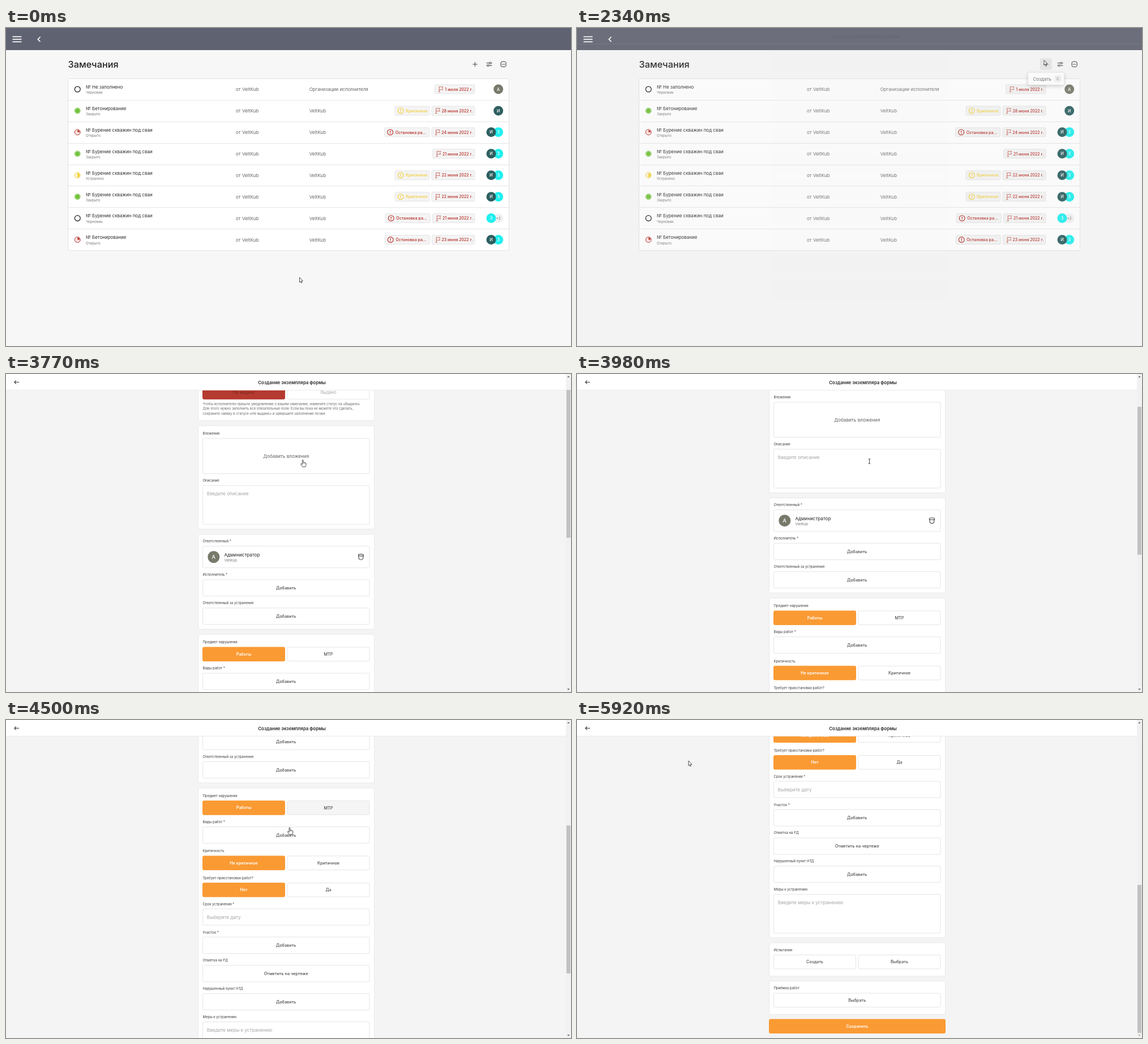
Write an HTML page with a canvas that moves like this. It is 998 px wide and 561 px high and loops after 5.97 s.

```html
<!DOCTYPE html>
<html lang="ru">
<head>
<meta charset="utf-8">
<title>Замечания</title>
<style>
html, body { margin: 0; width: 100%; height: 100%; overflow: hidden; background: #f7f7f7; }
canvas { display: block; width: 998px; height: 561px; }
</style>
</head>
<body>
<canvas id="stage"></canvas>
<script>
const W = 998, H = 561, LOOP = 5970, MAX_SCROLL = 605;
const FIRM = 'VeltKub';
const RED = '#b3261e', YELLOW = '#f3cc30', GREEN = '#70c13a', ORANGE = '#fa9a33', BRICK = '#b53a30';
const OLIVE = '#77796b', TEAL = '#2d5f60', CYAN = '#20efef', FLAG = '#c4574e';

const canvas = document.getElementById('stage');
const ctx = canvas.getContext('2d');
const dpr = window.devicePixelRatio || 1;
canvas.width = W * dpr;
canvas.height = H * dpr;

// ---------- motion ----------

// Smooth monotone curve through [time, value] points.
function curve(pts) {
  const n = pts.length;
  const d = pts.slice(1).map((p, i) => (p[1] - pts[i][1]) / (p[0] - pts[i][0]));
  const m = pts.map((_, i) => {
    if (i === 0 || i === n - 1 || d[i - 1] * d[i] <= 0) return 0;
    return 2 * d[i - 1] * d[i] / (d[i - 1] + d[i]);
  });
  return t => {
    if (t <= pts[0][0]) return pts[0][1];
    for (let i = 0; i < n - 1; i++) {
      const [t0, v0] = pts[i], [t1, v1] = pts[i + 1];
      if (t > t1) continue;
      const h = t1 - t0, u = (t - t0) / h, u2 = u * u, u3 = u2 * u;
      return v0 * (2 * u3 - 3 * u2 + 1) + v1 * (3 * u2 - 2 * u3) +
        h * (m[i] * (u3 - 2 * u2 + u) + m[i + 1] * (u3 - u2));
    }
    return pts[n - 1][1];
  };
}

const clamp = v => Math.max(0, Math.min(1, v));
const scrollAt = curve([[3510, 0], [3980, 104.5], [4500, 379.5], [4740, 522], [4940, 522], [5050, 573.5], [5200, 605]]);
const path = [
  [15, 518.5, 440], [600, 829, 61], [1050, 827, 60], [1420, 827, 60], [1920, 825, 57],
  [2420, 825, 57], [2870, 767, 112], [3490, 540, 148], [3980, 516.5, 154],
  [4380, 501, 189.5], [5750, 501, 189.5], [5920, 197, 72]
];
const mouseX = curve(path.map(p => [p[0], p[1]]));
const mouseY = curve(path.map(p => [p[0], p[2]]));

// ---------- drawing helpers ----------

function text(str, x, y, size, color, weight = 400, align = 'left') {
  ctx.font = `${weight} ${size}px Inter, "Open Sans", sans-serif`;
  ctx.fillStyle = color;
  ctx.textAlign = align;
  ctx.fillText(str, x, y + size * 0.36);
}

function box(x, y, w, h, r, fill, stroke) {
  ctx.beginPath();
  ctx.roundRect(x, y, w, h, r);
  if (fill) { ctx.fillStyle = fill; ctx.fill(); }
  if (stroke) { ctx.strokeStyle = stroke; ctx.lineWidth = 1; ctx.stroke(); }
}

function rect(x, y, w, h, fill) {
  ctx.fillStyle = fill;
  ctx.fillRect(x, y, w, h);
}

function disc(x, y, r, fill) {
  ctx.beginPath();
  ctx.arc(x, y, r, 0, 7);
  ctx.fillStyle = fill;
  ctx.fill();
}

function ring(x, y, r, color, width) {
  ctx.beginPath();
  ctx.arc(x, y, r, 0, 7);
  ctx.strokeStyle = color;
  ctx.lineWidth = width;
  ctx.stroke();
}

function line(pts, color, width = 1) {
  ctx.beginPath();
  pts.forEach(([x, y], i) => i ? ctx.lineTo(x, y) : ctx.moveTo(x, y));
  ctx.strokeStyle = color;
  ctx.lineWidth = width;
  ctx.stroke();
}

function shape(pts, fill, stroke) {
  ctx.beginPath();
  pts.forEach(([x, y]) => ctx.lineTo(x, y));
  ctx.closePath();
  ctx.fillStyle = fill;
  ctx.fill();
  if (stroke) {
    ctx.strokeStyle = stroke;
    ctx.lineWidth = 0.8;
    ctx.lineJoin = 'round';
    ctx.stroke();
  }
}

function avatar(x, y, r, letter, color) {
  disc(x, y, r, color);
  text(letter, x, y, r * 0.86, '#fff', 500, 'center');
}

// ---------- list page ----------

const HOLE = '№ Бурение скважин под сваи', CAST = '№ Бетонирование';
const STOP = 'Остановка ра...', CRIT = 'Критичное';
const rows = [
  ['№ Не заполнено', 'Черновик', '1 июля', 757.5, '', 'А'],
  [CAST, 'Закрыто', '28 июня', 752, CRIT, 'И'],
  [HOLE, 'Открыто', '24 июня', 752, STOP, 'ИЗ'],
  [HOLE, 'Закрыто', '21 июня', 753.5, '', 'ИЗ'],
  [HOLE, 'Устранено', '22 июня', 752, CRIT, 'ИЗ'],
  [HOLE, 'Закрыто', '22 июня', 752, CRIT, 'ИЗ'],
  [HOLE, 'Черновик', '21 июня', 753.5, STOP, 'З+'],
  [CAST, 'Открыто', '23 июня', 752.5, STOP, 'ИЗ']
];
const people = { 'А': OLIVE, 'И': TEAL, 'З': CYAN };

function statusIcon(x, y, status) {
  const color = { 'Черновик': '#222', 'Закрыто': GREEN, 'Открыто': RED, 'Устранено': YELLOW }[status];
  if (status === 'Закрыто') disc(x, y, 3.9, color);
  if (status === 'Открыто' || status === 'Устранено') {
    disc(x, y, 4.2, status === 'Открыто' ? '#fae3e1' : '#fdf4cf');
    ctx.beginPath();
    ctx.moveTo(x, y);
    ctx.arc(x, y, 3.7, -Math.PI / 2, status === 'Открыто' ? 0 : Math.PI / 2);
    ctx.fillStyle = color;
    ctx.fill();
  }
  ring(x, y, 4.9, color, status === 'Черновик' ? 1.3 : 1);
}

function dateBadge(left, y, date) {
  box(left, y - 8, 828 - left, 16, 2, '#f4f4f4', '#e5e5e5');
  const x = left + 6.5;
  line([[x + 1.2, y - 4.5], [x + 1.2, y + 4.5]], FLAG, 0.9);
  line([[x - 0.5, y + 4.6], [x + 3, y + 4.6]], FLAG, 0.8);
  line([[x + 1, y - 4.2], [x + 8, y - 4.2], [x + 6.3, y - 1.7], [x + 8, y + 0.8], [x + 1, y + 0.8]], FLAG, 0.8);
  text(date + ' 2022 г.', 824.3, y + 0.2, 7, RED, 500, 'right');
}

function levelBadge(right, y, label) {
  const w = label === STOP ? 79 : 60.5, x = right - w;
  const color = label === STOP ? RED : YELLOW;
  box(x, y - 8, w, 16, 2, '#f4f4f4', '#e5e5e5');
  ring(x + 10, y, 4.9, color, 1.1);
  line([[x + 10, y - 2.7], [x + 10, y + 0.7]], color, 1.2);
  disc(x + 10, y + 2.3, 0.75, color);
  text(label, x + 19, y + 0.2, 7.1, color, 500);
}

function drawRow(row, i) {
  const [name, status, date, left, level, who] = row;
  const y = 108 + i * 37.93;
  statusIcon(126.3, y, status);
  text(name, 141, y - 4, 8, '#2b2b2b');
  text(status, 141, y + 6.2, 6.2, '#777');
  text('от ' + FIRM, 406, y + 0.2, 8.1, '#666');
  text(i ? FIRM : 'Организации исполнителя', 535.7, y + 0.2, 8.05, '#666');
  dateBadge(left, y, date);
  if (level) levelBadge(left - 4.3, y, level);
  const last = who[who.length - 1];
  if (last === '+') {
    disc(869.7, y, 8.3, '#f0f0f0');
    text('+2', 869.7, y, 6.6, '#777', 400, 'center');
  } else {
    avatar(869.7, y, 8.5, last, people[last]);
  }
  if (who.length > 1) avatar(857, y, 8.5, who[0], people[who[0]]);
}

function drawToolbar(t) {
  const hover = clamp((t - 560) / 100);
  ctx.globalAlpha = hover;
  box(818, 53.5, 20.5, 20.5, 2, '#e7e7e7');
  ctx.globalAlpha = 1;
  line([[824.3, 64], [832.7, 64]], '#444');
  line([[828.5, 59.8], [828.5, 68.2]], '#444');
  line([[848.5, 61.8], [858.5, 61.8]], '#333');
  line([[848.5, 66.2], [858.5, 66.2]], '#333');
  for (const [x, y] of [[855.3, 61.8], [851.5, 66.2]]) {
    disc(x, y, 1.7, '#f7f7f7');
    ring(x, y, 1.6, '#333', 1);
  }
  box(874, 59.3, 9.2, 9.2, 2.6, null, '#333');
  for (let i = -1; i < 2; i++) disc(878.6 + i * 2.2, 64, 0.8, '#333');
}

function drawTip(t) {
  const a = clamp((t - 640) / 200);
  if (!a) return;
  ctx.save();
  ctx.globalAlpha = a;
  ctx.shadowColor = 'rgba(0,0,0,.22)';
  ctx.shadowBlur = 7;
  ctx.shadowOffsetY = 2;
  box(797, 79, 63, 21.3, 2.5, '#fff');
  ctx.shadowColor = 'transparent';
  text('Создать', 805.3, 89.7, 8.1, '#666');
  box(843.5, 83.5, 11.8, 12, 2, '#f0f0f0');
  text('C', 849.4, 89.6, 6, '#777', 400, 'center');
  ctx.restore();
}

function drawList(t) {
  rect(0, 0, W, H, '#f7f7f7');
  rect(0, 0, W, 39, '#5f6271');
  for (let i = 0; i < 3; i++) rect(11.5, 14.5 + i * 4.5, 16, 1.7, '#fff');
  line([[60.6, 15.6], [56.3, 19.9], [60.6, 24.2]], '#fff', 1.6);
  text('Замечания', 109.5, 64.2, 16.3, '#222', 500);
  drawToolbar(t);
  box(109.5, 89.5, 779, 303, 2, '#fff', '#e3e3e3');
  for (let i = 1; i < 8; i++) rect(110, Math.round(88.8 + i * 37.93), 778, 1, '#e6e6e6');
  rows.forEach(drawRow);
  drawTip(t);
}

// ---------- form page ----------

const LEFT = 347.5, FULL = 294.5, HALF = 145, RIGHT = 497, ADD = 'Добавить';
const cards = [[38, 85], [132, 182.5], [323.5, 167.5], [500, 489], [998, 59], [1065.5, 59]];
const labels = [
  [51.7, 'Статус ответственного'], [146, 'Вложения'], [229, 'Описание'], [336, 'Ответственный *'],
  [395, 'Исполнитель *'], [445, 'Ответственный за устранение'], [514, 'Предмет нарушения'],
  [560, 'Виды работ *'], [611.3, 'Критичность'], [658.7, 'Требует приостановки работ?'],
  [704.5, 'Срок устранения *'], [754.5, 'Участок *'], [804.3, 'Отметка на РД'],
  [854, 'Нарушенный пункт НТД'], [904, 'Меры к устранению'], [1010.5, 'Испытания'], [1078, 'Приёмка работ']
];
const help = [
  'Чтобы исполнителю пришло уведомление о вашем замечание, измените статус на «Выдано».',
  'Для этого нужно заполнить все обязательные поля. Если вы пока не можете это сделать,',
  'сохраните заявку в статусе «Не выдано» и завершите заполнение позже.'
];
const fields = [];
const field = (x, y, w, h, kind, label) => fields.push({ x, y, w, h, kind, label });
const wide = (y, label, h = 29) => field(LEFT, y, FULL, h, 'button', label);
const input = (y, label, h = 29) => field(LEFT, y, FULL, h, 'input', label);
function pair(y, a, b, kind = 'active', other = 'button') {
  field(LEFT, y, HALF, 24.5, kind, a);
  field(RIGHT, y, HALF, 24.5, other, b);
}

pair(60.5, 'Не выдано', 'Выдано', 'denied', 'disabled');
field(LEFT, 154.5, FULL, 62, 'drop', 'Добавить вложения');
input(237.5, 'Введите описание', 68.5);
field(LEFT, 344.5, FULL, 38, 'person', '');
wide(403.5, ADD);
wide(453.5, ADD);
pair(522.7, 'Работы', 'МТР');
wide(568.5, ADD);
pair(620, 'Не критичное', 'Критичное');
pair(667.5, 'Нет', 'Да');
input(713, 'Выберите дату');
wide(763, ADD);
wide(813, 'Отметить на чертеже');
wide(862.7, ADD);
input(912.5, 'Введите меры к устранению', 68.5);
pair(1019.5, 'Создать', 'Выбрать', 'button');
wide(1087, 'Выбрать', 24.5);
field(339.5, 1133, 311, 24.5, 'active', 'Сохранить');

// fill, border, text colour, text size, text weight
const looks = {
  button: ['#fff', '#e5e5e5', '#4c4c4c', 7.3, 500],
  active: [ORANGE, ORANGE, '#fff', 7.2, 600],
  denied: [BRICK, BRICK, '#7c231d', 7.3, 400],
  disabled: ['#fff', '#e6e6e6', '#aaa', 7.4, 400],
  drop: ['#fff', '#e5e5e5', '#606060', 8.2, 400],
  input: ['#fff', '#e5e5e5', '#a5a5a5', 8.2, 400],
  person: ['#fff', '#e5e5e5', '#222', 8.1, 400]
};

function fieldUnder(t) {
  if (t < 2700 || t > 4740) return null;
  const x = mouseX(t), y = mouseY(t) + scrollAt(t - 60);
  return fields.find(f => x >= f.x && x <= f.x + f.w && y >= f.y && y <= f.y + f.h);
}

function drawPerson(f) {
  const y = f.y + 19;
  avatar(366.8, y, 10.5, 'А', OLIVE);
  text('Администратор', 385.5, y - 4, 8.15, '#222');
  text(FIRM, 385.5, y + 6.2, 6.2, '#777');
  ctx.beginPath();
  ctx.ellipse(626.9, y - 3.3, 4.6, 1.6, 0, 0, 7);
  ctx.moveTo(622.4, y - 3);
  ctx.lineTo(623.6, y + 3.6);
  ctx.quadraticCurveTo(626.9, y + 6.2, 630.2, y + 3.6);
  ctx.lineTo(631.4, y - 3);
  ctx.strokeStyle = '#444';
  ctx.lineWidth = 1.1;
  ctx.stroke();
}

function drawField(f, hovered) {
  const [fill, stroke, color, size, weight] = looks[f.kind];
  const mid = f.y + f.h / 2;
  box(f.x, f.y, f.w, f.h, 2, hovered && f.kind === 'button' ? '#f5f5f5' : fill, stroke);
  if (f.kind === 'person') drawPerson(f);
  else if (f.kind === 'input') text(f.label, 354.8, f.h > 40 ? f.y + 14.7 : mid + 0.3, size, color, weight);
  else text(f.label, f.x + f.w / 2, mid, size, color, weight, 'center');
}

function drawScrollbar(s) {
  rect(989, 0, 9, H, '#f1f1f1');
  rect(990, 9 + s * 0.466, 7, 261, '#c1c1c1');
  shape([[991.3, 5.8], [993.5, 3.4], [995.7, 5.8]], s > 0 ? '#505050' : '#a3a3a3');
  shape([[991.3, 555.2], [993.5, 557.6], [995.7, 555.2]], s < MAX_SCROLL ? '#505050' : '#a3a3a3');
}

function drawFormBar(shift) {
  rect(0, 0, W, 28, '#fff');
  rect(0, 28, W, 1, '#ebebeb');
  line([[23, 14.5], [14.8, 14.5]], '#444', 1.1);
  line([[17.8, 11.5], [14.8, 14.5], [17.8, 17.5]], '#444', 1.1);
  text('Создание экземпляра формы', 505 + shift, 14.7, 8, '#2b2b2b', 600, 'center');
}

function drawForm(t) {
  const s = scrollAt(t), over = fieldUnder(t);
  rect(0, 0, W, H, '#f4f4f4');
  ctx.save();
  ctx.translate(0, -s);
  cards.forEach(([y, h]) => box(339.5, y, 311, h, 2, '#fff', '#e9e9e9'));
  labels.forEach(([y, label]) => text(label, LEFT, y, 6.05, '#3c3c3c'));
  help.forEach((row, i) => text(row, LEFT, 93.5 + i * 8.3, 6, '#666'));
  fields.forEach(f => drawField(f, f === over));
  ctx.restore();
  drawFormBar(0);
  drawScrollbar(s);
}

// The placeholder page fades in over the list.
function drawLoading(t) {
  const a = Math.pow(clamp((t - 2270) / 300), 1.7);
  rect(0, 0, W, H, `rgba(0,0,0,${0.015 * clamp((t - 2270) / 40)})`);
  ctx.save();
  ctx.globalAlpha = a;
  rect(0, 28, W, H, '#f4f4f4');
  drawFormBar(4.5);
  for (let i = 0; i < 10; i++) box(344, 45.5 + i * 44, 311, 35, 2, '#e0e0e0');
  ctx.restore();
}

// ---------- pointer ----------

function drawPointer(t) {
  const over = fieldUnder(t);
  ctx.save();
  ctx.translate(mouseX(t), mouseY(t));
  if (!over || over.kind === 'disabled' || over.kind === 'denied' || over.kind === 'person') {
    shape([[0, 0], [0, 8.6], [1.9, 6.9], [3.2, 9.8], [4.5, 9.2], [3.2, 6.4], [5.9, 6.2]], '#fff', '#222');
  } else if (over.kind === 'input') {
    line([[-1.8, -4], [1.8, -4]], '#333', 0.9);
    line([[0, -4], [0, 4]], '#333', 0.9);
    line([[-1.8, 4], [1.8, 4]], '#333', 0.9);
  } else {
    shape([
      [-0.9, 0.9], [0, 0], [0.9, 0.9], [0.9, 4.6], [2.4, 4.5], [2.9, 5.2], [4.2, 5.2], [4.6, 6],
      [5.7, 6.3], [5.7, 9.3], [4.6, 12.6], [-0.5, 12.6], [-3.6, 8], [-3.2, 7], [-2, 7.2], [-0.9, 8.4]
    ], '#fff', '#222');
    line([[0.9, 5], [0.9, 7]], '#222', 0.6);
    line([[2.7, 5.4], [2.7, 7.2]], '#222', 0.6);
  }
  ctx.restore();
}

function draw(t) {
  ctx.setTransform(dpr, 0, 0, dpr, 0, 0);
  if (t < 2640) {
    drawList(t);
    if (t >= 2275) drawLoading(t);
  } else {
    drawForm(t);
  }
  drawPointer(t);
}

const start = performance.now();
function frame() {
  draw((performance.now() - start) % LOOP);
  requestAnimationFrame(frame);
}
frame();
</script>
</body>
</html>
```
